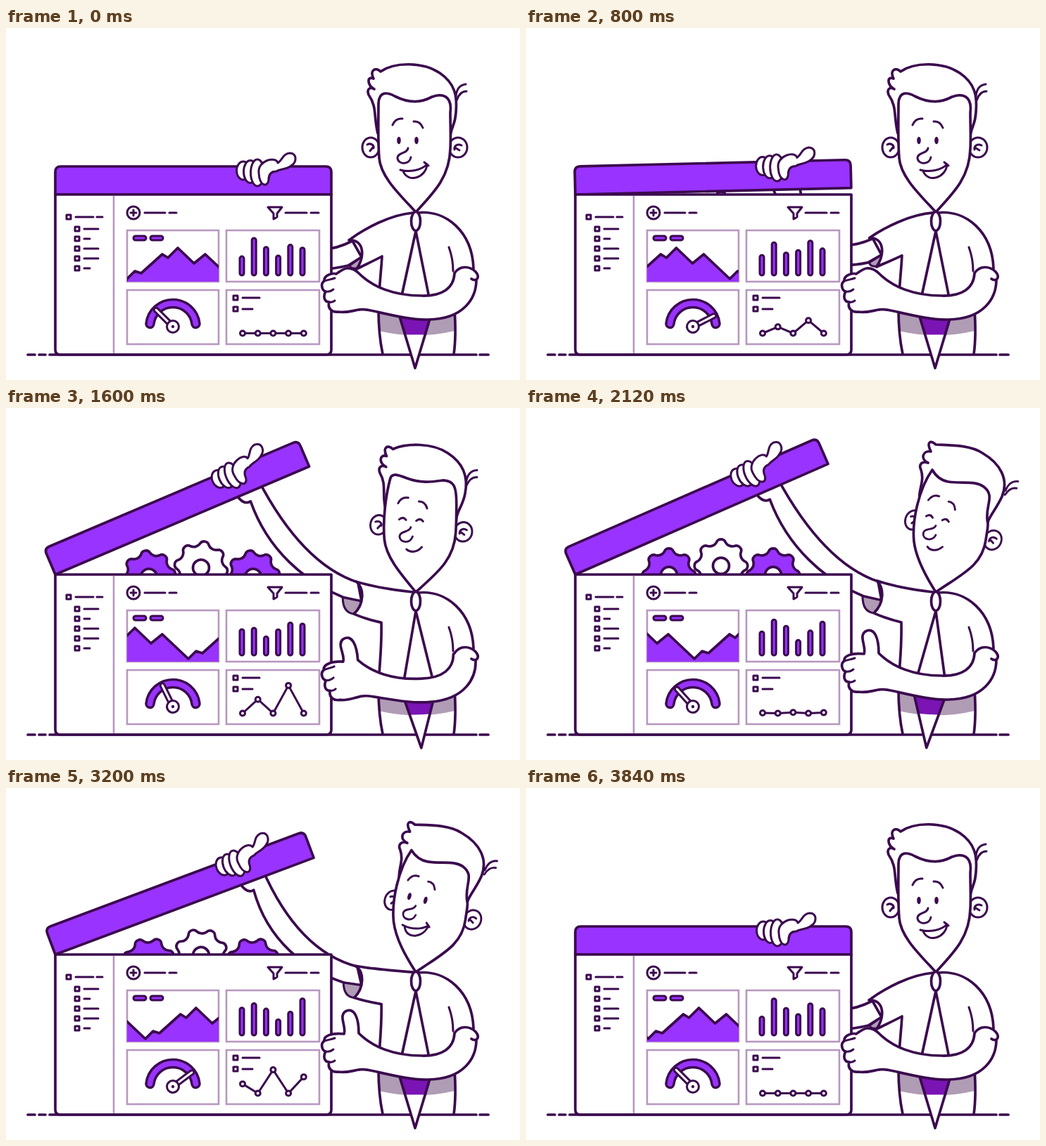
Recreate the animation shown at these times as an HTML page. Size 730 px wide and 501 px high, loop 3.88 s.

```html
<!DOCTYPE html>
<html lang="en">
<head>
<meta charset="utf-8">
<title>Opening the dashboard</title>
<style>
  html, body { margin: 0; width: 100%; height: 100%; overflow: hidden; background: #fff; }
  svg { display: block; width: 730px; height: 501px; }
  .ink { fill: none; stroke: #3b0a4e; stroke-width: 3.7; stroke-linecap: round; stroke-linejoin: round; }
  .thin { stroke-width: 3; }
  .paper { fill: #fff; }
  .violet { fill: #9933ff; }
  .grey { fill: #b09cb5; }
  .solid { fill: #3b0a4e; stroke: none; }
  .frame { fill: none; stroke: #b897c0; stroke-width: 2.6; }
  .wide { stroke-width: 9; }
  .core { stroke: #9933ff; stroke-width: 3; }
  .arc { stroke-width: 14.5; }
  .arc.core { stroke-width: 7.5; }
</style>
</head>
<body>
<svg viewBox="0 0 730 501">
  <defs>
    <clipPath id="areaClip"><path d="M172 289H302V361H172Z"/></clipPath>
    <path id="kite" d="M582 289L557 404L581 484L605 404Z"/>
    <path id="gauge" d="M204.5 421A32.7 32.7 0 0 1 269.5 421"/>
    <clipPath id="tieClip"><use href="#kite"/></clipPath>
  </defs>

  <!-- raised arm, gears and lid stay behind the window -->
  <path id="arm" class="ink paper"/>
  <path id="cuff" class="ink thin grey"/>
  <g id="gears" class="ink"></g>
  <path id="lid" class="ink violet" d="M70 237V205Q70 197 78 197H454Q462 197 462 205V237Z"/>

  <path class="ink paper" d="M70 237H462V458Q462 465 455 465H77Q70 465 70 458Z"/>
  <g id="panels" class="frame"><path d="M153 239V463"/></g>
  <g id="list" class="ink thin paper"></g>
  <g class="ink thin">
    <circle cx="181" cy="263" r="9"/>
    <path d="M177 263H185M181 259V267M197 263H226M232 263H242M397 263H427M433 263H444"/>
    <path d="M372 255H392L385 264V269L380 272V264Z"/>
  </g>

  <path id="area" class="ink violet" clip-path="url(#areaClip)"/>
  <path class="ink wide" d="M184 299H196M208 299H220"/>
  <path class="ink core" d="M184 299H196M208 299H220"/>
  <path id="bars" class="ink wide"/>
  <path id="barCores" class="ink core"/>
  <use href="#gauge" class="ink arc"/>
  <use href="#gauge" class="ink arc core"/>
  <g id="needle" class="ink thin paper">
    <path d="M234 425V391Q237 385 240 391V425Z"/>
    <circle cx="237" cy="425" r="8.5"/>
    <circle class="solid" cx="237" cy="425" r="2.2"/>
  </g>
  <g id="plot" class="ink thin"></g>

  <g id="grip" class="ink thin paper"></g>

  <!-- torso -->
  <path class="paper" d="M582 263C625 260 662 290 664 345L637 348V465H535L529 400L534 326Z"/>
  <path id="sleeve" class="ink paper"/>
  <path id="belt" class="grey" d="M529 400V431Q584 444 637 431V400Z"/>
  <path class="ink" d="M529 400C529 430 532 450 535 464M637 400C639 430 638 450 636 464"/>
  <path class="ink" d="M31 465H41M47 465H56M62 465H668M673 465H685"/>
  <g id="tie">
    <use href="#kite" class="paper"/>
    <path clip-path="url(#tieClip)" fill="#7a14b4" d="M529 400V433Q584 440 637 433V400Z"/>
    <use href="#kite" class="ink"/>
  </g>
  <path class="ink" d="M584 263C625 258 662 290 664 342"/>
  <path class="ink thin" d="M629 312C633 323 635 334 635 346"/>

  <!-- head -->
  <g id="ears" class="ink thin">
    <ellipse class="paper" cx="518" cy="170" rx="12" ry="14"/>
    <ellipse class="paper" cx="642" cy="170" rx="13" ry="14"/>
    <path d="M513 166C518 163 523 167 522 171M517 175L521 170M647 167C641 164 636 168 637 173M644 174L639 171"/>
    <path d="M639 97C640 86 645 81 653 80M640 103C643 94 648 90 654 90"/>
  </g>
  <path id="hair" class="ink paper"/>
  <path id="face" class="ink paper"/>
  <g id="features" class="ink thin">
    <path d="M549 138Q553 128 563 129M579 133Q588 132 592 142"/>
    <path d="M571 171C570 179 556 177 556 185C557 195 573 195 575 184"/>
    <path id="mouth"/>
    <path id="dimple" d="M594 191L600 196"/>
    <g id="eyes" class="solid"><ellipse cx="558" cy="160" rx="2.8" ry="5.2"/><ellipse cx="583" cy="160" rx="2.8" ry="5.2"/></g>
    <path id="lashes" d="M553 161Q558 156 563 161M578 161Q583 156 588 161"/>
  </g>
  <ellipse class="ink paper" cx="582" cy="275" rx="6.5" ry="13.5"/>

  <g id="forearm" class="ink">
    <path id="fist" class="paper"/>
    <path class="thin" d="M452 360C458 358 462 358 467 356M454 375Q460 376 465 372M459 390Q463 391 467 388"/>
  </g>
  <path class="ink paper" d="M637 349C645 337 659 339 667 347C674 355 668 362 661 357"/>
</svg>

<script>
const LOOP = 3880, TAU = Math.PI * 2;
const $ = id => document.getElementById(id);
const set = (el, name, v) => el.setAttribute(name, v);

function add(parent, tag, attrs = {}) {
  const el = document.createElementNS('http://www.w3.org/2000/svg', tag);
  for (const k in attrs) set(el, k, attrs[k]);
  return parent.appendChild(el);
}

// Smooth 0 to 1 between two times.
function ramp(t, from, to) {
  const u = Math.min(1, Math.max(0, (t - from) / (to - from)));
  return u * u * (3 - 2 * u);
}

// Damped swing from 0 to 1.
const spring = t => t < 0 ? 0 : 1 - Math.exp(-t / 230) * Math.cos(Math.PI * t / 460);

// Blend two paths that share one structure.
function mix(a, b, t) {
  const to = b.match(/-?[\d.]+/g);
  let i = 0;
  return a.replace(/-?[\d.]+/g, n => (+n + (to[i++] - n) * t).toFixed(2));
}

// Fixed window parts
for (let row = 0; row < 2; row++)
  for (let col = 0; col < 2; col++)
    add($('panels'), 'rect', { x: 172 + 141 * col, y: 288 + 85 * row, width: 130 + 2 * col, height: 73 + 4 * row });

function entry(x, y, dash) {
  add($('list'), 'rect', { x: x - 3, y: y - 3, width: 6, height: 6 });
  add($('list'), 'path', { d: `M${x + 10} ${y}${dash}` });
}
entry(89, 269, 'h25m5 0h8');
for (let i = 0; i < 5; i++) entry(101, 286 + 14 * i, i % 3 === 1 || i === 4 ? 'h8' : 'h20');
entry(326, 384, 'h24');
entry(326, 400, 'h14');

// Hand on the lid
for (let i = 0; i < 3; i++)
  add($('grip'), 'ellipse', { cx: 337 + 10 * i, cy: 203 + 1.5 * i, rx: 9.5, ry: 13 + 3 * i });
add($('grip'), 'path', { d: 'M359 206C357 188 384 182 386 192C392 189 393 179 403 178C414 179 413 191 405 196C398 202 390 200 384 204C376 204 373 209 373 216C372 227 360 226 359 206Z' });

function gearPath(teeth) {
  const at = deg => {
    const a = deg * TAU / 360;
    return `${(34 * Math.sin(a)).toFixed(2)} ${(-34 * Math.cos(a)).toFixed(2)}`;
  };
  const step = 360 / teeth;
  let d = 'M' + at(-11);
  for (let a = 0; a < 360; a += step)
    d += `A7 7 0 0 1 ${at(a + 11)}A11 11 0 0 0 ${at(a + step - 11)}`;
  return d + 'Z';
}
const gears = [-1, 1, 0].map(side => {
  const el = add($('gears'), 'g');
  add(el, 'path', { class: side ? 'violet' : 'paper', d: gearPath(8) });
  add(el, 'circle', { class: 'paper', r: 11.5 });
  return { el, x: 277 + 74 * side, y: side ? 238 : 225, dir: side ? 1 : -1 };
});
const line = add($('plot'), 'path');
const dots = [0, 1, 2, 3, 4].map(i => add($('plot'), 'circle', { class: 'paper', r: 3.5, cx: 336 + 21.7 * i }));

// One stretch of the mountain ridge, repeated while it scrolls.
const ridge = [[0, 357], [11, 346], [20, 349], [50, 322], [58, 327], [72, 313], [95, 335], [111, 322]];
const barMiddles = [318, 307, 318, 323, 311, 307];

function drawCharts(t) {
  const width = 148, left = 172 - width * t / LOOP;
  let d = `M${left - 9} 380`;
  for (let k = 0; k < 3; k++)
    for (const [x, y] of ridge) d += `L${left + x + k * width} ${y}`;
  set($('area'), 'd', d + 'V380Z');

  const bars = barMiddles.map((mid, i) => {
    const phase = .95 - .4 * (i % 2) - .33 * (i >> 1);
    return `M${335 + 17.2 * i} 349V${mid + 2.5 + 8 * Math.cos(TAU * (t / 970 - phase))}`;
  }).join('');
  set($('bars'), 'd', bars);
  set($('barCores'), 'd', bars);

  // Needle and line chart run twice per loop.
  const half = t % (LOOP / 2), u = Math.min(half, 1940 - half) / 970;
  const ease = u < .5 ? 4 * u ** 3 : 1 - 4 * (1 - u) ** 3;
  set($('needle'), 'transform', `rotate(${-45 + 110 * ease} 237 425)`);

  const rise = ramp(half, 0, 1700) - ramp(half, 1700, 1880);
  const peaks = t < LOOP / 2 ? [0, 20, 0, 40, 0] : [16, 0, 40, 0, 28];
  const points = dots.map((dot, i) => {
    const y = 434.5 - peaks[i] * rise;
    set(dot, 'cy', y);
    return `${336 + 21.7 * i} ${y}`;
  });
  set(line, 'd', 'M' + points.join('L'));
}

function drawLid(t) {
  const open = spring(t - 788) * (1 - .13 * ramp(t, 2200, 3250)) * (1 - ramp(t, 3200, 3720));
  const deg = -23.6 * open, a = deg * TAU / 360;
  for (const id of ['lid', 'grip']) set($(id), 'transform', `rotate(${deg} 70 237)`);

  const onLid = (x, y) => {
    const dx = x - 70, dy = y - 237, c = Math.cos(a), s = Math.sin(a);
    return `${70 + dx * c - dy * s} ${237 + dx * s + dy * c}`;
  };
  set($('arm'), 'd', `M${onLid(388, 226)}` +
    mix('C400 330 455 322 492 303L505 326L486 338C430 352 370 340 ', 'C403 185 450 230 500 247L505 274L479 268C425 245 372 200 ', open) +
    `${onLid(366, 250)}Q${onLid(355, 252)} ${onLid(351, 234)}`);
  set($('cuff'), 'd', mix('M488 338C489 341 492 343 498 342C503 337 505 330 505 326Z',
    'M478 268C478 284 484 291 494 292C502 286 505 278 505 274Z', open));
  set($('sleeve'), 'd', mix('M578 263C545 266 510 285 487 302C509 301 510 325 498 343C510 337 525 330 534 325C533 345 530 365 529 400',
    'M578 262C550 259 520 253 498 246C509 256 509 278 494 292C505 297 520 302 533 305C534 345 530 365 529 400', open));

  const drop = 46 * (1 - open ** 2.4), spin = (t - 2120) * 45 / 440;
  for (const { el, x, y, dir } of gears)
    set(el, 'transform', `translate(${x} ${y + drop}) rotate(${dir * spin})`);
}

function drawMan(t) {
  const up = ramp(t, 800, 1120), nod = ramp(t, 1260, 1600) - ramp(t, 1600, 1960);
  const h = up - .65 * nod - ramp(t, 3150, 3700);

  // The head leans about the neck; the features slide further round it.
  const lean = `translate(582 262) matrix(${1 - .09 * h} ${.23 * h} ${-.286 * h} ${1 - .045 * h} 0 0) translate(-582 -262)`;
  set($('ears'), 'transform', lean);
  set($('features'), 'transform', `translate(${-16 * h} ${-5 * h}) ${lean}`);
  set($('hair'), 'd', mix(
    'M528 150C522 125 527 112 515 95C512 87 517 83 523 87C512 80 513 68 522 72C516 60 525 55 532 62C552 48 592 48 616 64C638 79 641 97 639 120C638 140 631 142 631 156',
    'M560 136C555 118 567 106 561 88C557 80 563 75 571 78C559 72 564 60 575 62C568 47 575 46 582 52C600 53 630 52 648 64C674 79 686 102 676 126C666 148 653 158 655 172', h));
  set($('face'), 'd', mix(
    'M582 262C560 238 532 212 530 185C528 160 529 130 529 107C530 90 541 91 552 97C574 108 590 106 605 98C620 92 634 97 631 120C631 140 632 155 631 172C630 212 608 234 582 262',
    'M582 262C568 240 554 215 551 190C548 160 558 115 577 88C581 95 588 103 600 105C620 108 637 103 650 112C668 126 650 140 656 165C656 172 654 180 653 188C648 224 620 236 582 262', h));

  const smile = 1 - ramp(t, 860, 1060) + ramp(t, 2720, 2960);
  set($('mouth'), 'd', mix('M568 203C575 208 584 206 590 198C584 206 575 208 568 203',
    'M560 202C574 206 590 202 598 194C597 212 572 222 564 204', smile));
  $('dimple').style.opacity = smile > .5 ? 1 : 0;
  const shut = ramp(t, 1360, 1460) - ramp(t, 2280, 2380) > .5;
  $('eyes').style.opacity = shut ? 0 : 1;
  $('lashes').style.opacity = shut ? 1 : 0;

  set($('tie'), 'transform', `rotate(${3.6 * up - 6.2 * nod - 3.6 * ramp(t, 2120, 3200)} 582 289)`);

  const thumb = mix('C497 345 490 341 484 342C478 343 474 347 469 350',
    'C501 328 495 311 482 318C472 325 484 340 480 350', ramp(t, 880, 1180) - ramp(t, 3300, 3640));
  set($('fist'), 'd', 'M637 349C636 370 620 382 590 381C550 381 520 368 501 349' + thumb +
    'C462 348 451 353 452 360C446 364 449 374 454 375C450 382 452 390 459 390C456 400 464 405 472 404C490 407 498 397 518 402C545 408 575 416 600 415C650 414 668 385 668 358');
  set($('forearm'), 'transform', `rotate(${-3.6 * nod} 655 375)`);
}

const start = performance.now();
function frame() {
  const t = (performance.now() - start) % LOOP;
  drawLid(t);
  drawCharts(t);
  drawMan(t);
  requestAnimationFrame(frame);
}
frame();
</script>
</body>
</html>
```
